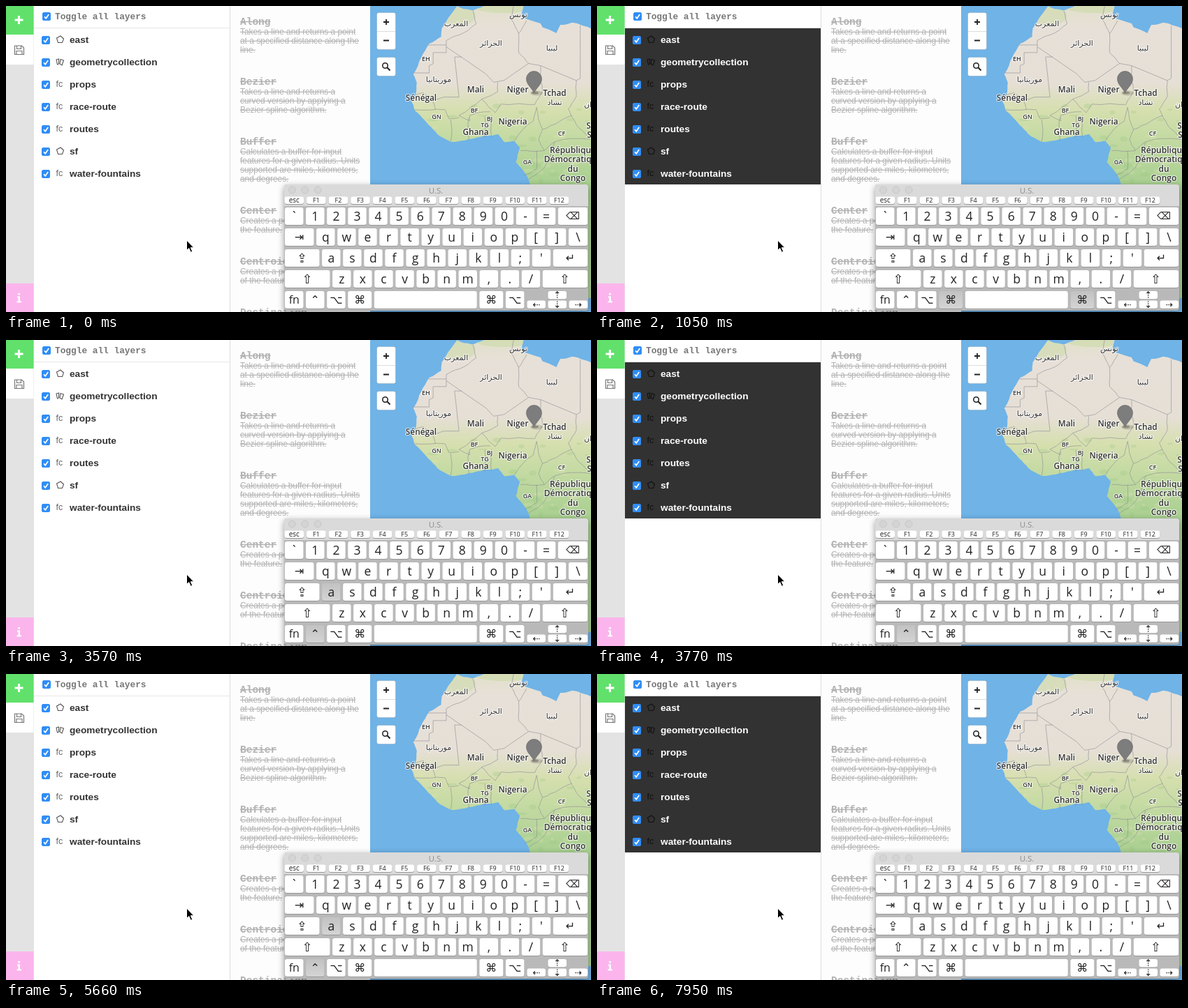
An HTML page that plays this animation: 837x439 px, repeating every 8 s.

```html
<!DOCTYPE html>
<html lang="en">
<head>
<meta charset="utf-8">
<title>Layer list shortcuts</title>
<style>
  html, body { margin: 0; width: 100%; height: 100%; overflow: hidden; background: #fff; }
  svg { display: block; width: 837px; height: 439px; }
  text { white-space: pre; }
  .sans { font-family: "Liberation Sans", Arial, sans-serif; }
  .mono { font-family: "Liberation Mono", "Courier New", monospace; font-weight: 700; }
  .strike { text-decoration: line-through; fill: #b2b2b2; }
  .label { font-family: "Open Sans", "DejaVu Sans", sans-serif; font-weight: 600; fill: #333;
    text-anchor: middle; paint-order: stroke; stroke: #fff; stroke-opacity: .75; stroke-width: 2.2px; stroke-linejoin: round; }
  .arabic { font-family: "DejaVu Sans", sans-serif; font-weight: 400; }
  .key { font-family: "Open Sans", "DejaVu Sans", sans-serif; text-anchor: middle; fill: #222; }
  .sym { font-family: "DejaVu Sans", sans-serif; }
  #board { filter: drop-shadow(0 3px 5px rgba(0,0,0,.4)); }
</style>
</head>
<body>
<svg viewBox="0 0 837 439" xmlns="http://www.w3.org/2000/svg">
  <defs>
    <linearGradient id="landFill" gradientUnits="userSpaceOnUse" x1="0" y1="0" x2="0" y2="256">
      <stop offset="0" stop-color="#e2e0ca"/>
      <stop offset=".12" stop-color="#e7e0d8"/>
      <stop offset=".43" stop-color="#e6dfd6"/>
      <stop offset=".58" stop-color="#d6dfaf"/>
      <stop offset=".72" stop-color="#c6dba4"/>
      <stop offset="1" stop-color="#a8cf90"/>
    </linearGradient>
    <linearGradient id="keyDown" x1="0" y1="0" x2="0" y2="1">
      <stop offset="0" stop-color="#c2c2c2"/><stop offset="1" stop-color="#d4d4d4"/>
    </linearGradient>
    <clipPath id="mapClip"><path d="M521 0H837V439H521Z"/></clipPath>
    <clipPath id="landClip"><path id="landShape"/></clipPath>
  </defs>

  <rect width="837" height="439" fill="#fff"/>
  <g id="rail">
    <rect width="40" height="439" fill="#e3e3e3"/>
    <rect width="39.500" height="41" fill="#61e16b"/>
    <path d="M18.500 14V26M12.500 20H24.500" stroke="#fff" stroke-width="3"/>
    <rect y="41" width="39.500" height="43" fill="#fff"/>
    <g fill="none" stroke="#777" stroke-width="1.200">
      <path d="M12.500 57H22.500L25.500 60V69.500H12.500Z"/>
      <path d="M15.500 57V61.500H21.500V57M15 69V64.500H23V69"/>
    </g>
    <rect y="398" width="39.500" height="41" fill="#fbb5ec"/>
    <path d="M16 416.500H20V423.500H22V425.500H15.500V423.500H17.500V418.500H16ZM17.200 412H20V414.600H17.200Z" fill="#fff"/>
  </g>
  <g id="layers"></g>
  <rect x="320" width="202" height="439" fill="#fdfdfd"/>
  <path d="M320.500 0V439" stroke="#ddd"/>
  <g id="docs"></g>
  <g id="map" clip-path="url(#mapClip)"></g>
  <g id="controls">
    <g fill="#fff" stroke="#000" stroke-opacity=".12">
      <rect x="530.500" y="9.500" width="27" height="53" rx="3"/>
      <rect x="530.500" y="73.500" width="27" height="27" rx="3"/>
    </g>
    <path d="M531 36.500H557" stroke="#ddd"/>
    <path d="M540 23H548M544 19V27M540 49.500H548" stroke="#222" stroke-width="1.800"/>
    <circle cx="542.500" cy="85.500" r="3.700" fill="none" stroke="#222" stroke-width="1.600"/>
    <path d="M545.300 88.300L549.500 92.500" stroke="#222" stroke-width="2"/>
  </g>
  <g id="board"></g>
  <path d="M258.500 336V350.500L261.800 347.500L264.300 353.300L266.700 352.200L264.300 346.700H268.800Z"
    fill="#000" stroke="#fff" stroke-width="1"/>
</svg>

<script>
const LOOP = 8000;
const $ = id => document.getElementById(id);
const text = (x, y, size, cls, str, extra = '') =>
  `<text x="${x}" y="${y}" font-size="${size}" class="${cls}" ${extra}>${str}</text>`;

let seed = 7;
const rnd = () => (seed = seed * 16807 % 2147483647) / 2147483647;
const spread = size => (rnd() - .5) * size;

// Layer list
const polygonIcon = 'M72.5 46L78 43L82.5 47L80.500 52.500H74.500Z';
const mixedIcon = 'M72 45L75.500 44V51L73.500 52ZM78 44.500L82.500 46L80 53L77 51Z';
const layers = [
  ['east', polygonIcon], ['geometrycollection', mixedIcon], ['props'], ['race-route'],
  ['routes'], ['sf', polygonIcon], ['water-fountains'],
];
const checkbox = (x, y) =>
  `<g transform="translate(${x} ${y})">
    <rect x=".5" y=".5" width="11" height="11" rx="2.500" fill="#fff" stroke="#bbb"/>
    <g class="on"><rect width="12" height="12" rx="2.500" fill="#2f8df7"/>
    <path d="M3 6.300L5.200 8.800L9.200 3" fill="none" stroke="#fff" stroke-width="1.700"/></g></g>`;

$('layers').innerHTML =
  '<path d="M40 31.500H320" stroke="#e8e8e8"/>' + checkbox(52, 9) +
  text(70, 19, 12.8, 'mono', 'Toggle all layers', 'fill="#777"') +
  '<rect id="selection" x="40" y="32" width="280" height="224" fill="#323232"/>' +
  layers.map(([name, icon], i) =>
    `<g class="row" transform="translate(0 ${i * 32})">` + checkbox(51, 43) +
    (icon ? `<path class="icon" d="${icon}" fill="none" stroke-width="1.100"/>`
          : text(71.5, 52, 12.5, 'sans kind', 'fc')) +
    text(91, 53, 13.7, 'sans name', name, 'font-weight="700"') + '</g>').join('');

// Function reference, flowing down the column
const docs = [
  ['Along', 'Takes a line and returns a point', 'at a specified distance along the', 'line.'],
  ['Bezier', 'Takes a line and returns a', 'curved version by applying a', 'Bezier spline algorithm.'],
  ['Buffer', 'Calculates a buffer for input', 'features for a given radius. Units',
    'supported are miles, kilometers,', 'and degrees.'],
  ['Center', 'Creates a point at the center of', 'the feature.'],
  ['Centroid', 'Creates a point at the centroid', 'of the feature.'],
  ['Destination'],
];
let docY = 26.5;
for (const [title, ...lines] of docs) {
  $('docs').innerHTML += text(335, docY, 14.5, 'mono strike', title) +
    lines.map((s, i) => text(335, docY + 14.5 + i * 13, 11.9, 'sans strike', s)).join('');
  docY += 47 + 13 * lines.length;
}

// Map: Mercator projection of "lon,lat" key points, roughened by midpoint displacement
const project = ([lon, lat]) => [
  679.4 + 5.69 * lon,
  220 - 325.9 * Math.log(Math.tan(Math.PI / 4 + lat * Math.PI / 360)),
];
const roughen = (pts, amount) => pts.flatMap((p, i) => {
  const q = pts[i + 1];
  if (!q) return [p];
  const size = amount * Math.hypot(q[0] - p[0], q[1] - p[1]);
  return [p, p.map((v, k) => (v + q[k]) / 2 + spread(size))];
});
const trace = (str, amount = 0) => {
  const pts = str.split(' ').map(s => project(s.split(',').map(Number)));
  const fine = roughen(roughen(pts, amount), amount);
  return 'M' + fine.map(p => p.map(v => v.toFixed(1))).join('L');
};

const coast = [
  '-6,36 -9.8,31.4 -10,29.5 -13,28 -14.9,25 -17,21 -16.1,19 -16.5,16 -17.5,14.7 -16.6,12.2 -13.2,8.7 -11,6.4 -7.5,4.4',
  '-3,5.1 1,6 4.4,6.3 6,4.3 8.5,4.6 9.8,3 8.8,-.7 12,-5 14,-11 12,-18 18,-34 28,-33',
  '28,31.2 23,32.6 20,32.1 19,30.3 15.5,31.6 15,32.4 10.2,33.8 11,37.5 2,36.6 -2,35.1 -5,35.6',
].join(' ');
const straight = [
  '-8.7,28.7 -8.7,26 -12,26 -12,23.4 -13,23 -13,21.3 -17,21.3',
  '-8.7,27.7 -13.2,27.7',
  '-8.7,27.3 1.2,21.1 3.2,19.1 5.8,19.5 12,23.5 15,23 24,19.5 25,20 25,32',
  '-4.8,25 -6.6,25 -5.5,15.5 -9.3,15.5',
];
const winding = [
  '-2,35 -1.2,32.3 -5.5,29.9 -8.7,28.7',
  '12,23.5 9.5,26 9.5,30.2 7.6,33.3 8.4,37',
  '9.5,30.2 11.5,33',
  '-9.3,15.5 -12.2,14.8 -14.5,16.6 -16.5,16',
  '24,19.5 24,15.7 22,12.6 24,8.7 27.4,5.1 18.6,4.4 16,2.2 10,2.2',
  '15,23 15.5,17 13.6,13.7 5,13.8 3.6,11.7',
  '4.2,19.1 4.2,16.8 .2,15 3.6,11.7',
  '.2,15 -5.5,11 -2.8,9.7 -2.8,11 2.4,11.9',
  '-5.5,10.5 -8,10.2 -9,12.4 -16.7,12.4',
  '-11.4,12.4 -12.2,14.8',
  '8.5,4.7 13.2,9.6 14,13 15.5,7.5 14.5,5 16,2.2',
  '15.5,7.5 19,9 22.9,11',
  '18.6,4.4 16,-2 12,-5',
  '14,2.2 14,-2.4 11,-4',
  ...[-7.6, -3, 1, 2.7].map(lon => `${lon},${5.3 + lon / 9} ${lon},${10.8 + lon / 9}`),
];
const land = trace(coast, .12) + 'Z';
const borders = straight.map(s => trace(s)).join('') + winding.map(s => trace(s, .12)).join('');
$('landShape').setAttribute('d', land);

const patch = (x, y, rx, ry, fill, opacity) =>
  `<ellipse cx="${x}" cy="${y}" rx="${rx}" ry="${ry}" fill="${fill}" opacity="${opacity}"/>`;
let relief = patch(648, 14, 24, 14, '#cfdcae', .6) + patch(712, 2, 40, 8, '#cfdcae', .7);
for (let i = 0; i < 80; i++) {
  relief += patch(700 + spread(272), 200 + spread(116), 2 + rnd() * 7, 1 + rnd() * 3,
    i % 2 ? '#93c47d' : '#dde2b5', .25);
}

const places = [
  [672, 124, 'Mali'], [732, 124, 'Niger'], [785, 129, 'Tchad'], [594, 136, 'Sénégal'],
  [725, 170, 'Nigeria'], [672, 185, 'Ghana'], [601, 79, 'EH'], [616, 162, 'GN'],
  [670, 153, 'BF'], [692, 165, 'BJ'], [685, 174, 'TG'], [795, 186, 'CF'], [746, 227, 'GA'],
  [847, 176, 'South'], [849, 189, 'Sudan'],
];
const arabic = [
  [644, 29, 'المغرب'], [694, 57, 'الجزائر'], [733, 16, 'تونس'], [781, 64, 'ليبيا'],
  [619, 109, 'موريتانيا'], [785, 142, 'تشاد'], [846, 145, 'السودان'],
];
$('map').innerHTML =
  '<rect x="521" width="316" height="439" fill="#6fb3e7"/>' +
  `<path d="${land}" fill="url(#landFill)"/><g clip-path="url(#landClip)">${relief}</g>` +
  `<path d="${borders}" fill="none" stroke="#8f8f96" stroke-width=".8" opacity=".8"/>` +
  places.map(([x, y, s]) => text(x, y, s.length > 2 ? 11.8 : 9, 'label', s)).join('') +
  ['République', 'Démocratique', 'du', 'Congo'].map((s, i) =>
    text(811, 210.5 + i * 13.6, 12, 'label', s)).join('') +
  arabic.map(([x, y, s]) => text(x, y, 11, 'label arabic', s)).join('') +
  `<g id="pin">${patch(759, 125, 9, 3.5, '#000', .14)}${patch(757, 124.5, 5, 2, '#000', .25)}
    <path d="M755.500 125C753 118 744.500 113 744.500 104.500A11 11 0 0 1 766.500 104.500C766.500 113 758 118 755.500 125Z"
      fill="#7d7d7d" stroke="#6b6b6b" stroke-width=".7"/></g>`;

// On-screen keyboard: rows flow from the left, the last key fills the row
const GAP = 3.57, KEY = 26.5, LEFT = 399, RIGHT = 832;
const symbolSize = { '⌫': 14, '⇧': 18, '⇪': 18 };
const key = (x, y, w, label, h = 25, small = 0) => {
  const sym = /[\u2190-\u23ff]/.test(label);
  const size = small || (sym ? symbolSize[label] || 16 : label.length > 1 ? 16 : 17.5);
  return `<g data-key="${label}"><rect x="${x}" y="${y + 1}" width="${w}" height="${h}" rx="3" fill="#999"/>
    <rect class="cap" x="${x}" y="${y}" width="${w}" height="${h}" rx="3" fill="#fff"/>` +
    text(x + w / 2, y + h / 2 + size * .35, size, sym ? 'key sym' : 'key', label) + '</g>';
};
const row = (y, labels, wide = {}, fill = true) => {
  let x = LEFT;
  return labels.map((label, i) => {
    const last = fill && i === labels.length - 1;
    const w = last ? RIGHT - x : !i && wide.first || wide[label] || KEY;
    const out = key(x, y, w, label);
    x += w + GAP;
    return out;
  }).join('');
};
const arrow = (col, y, label) => key(745.5 + col * 30, y, KEY, label, 11.5, 13);

$('board').innerHTML =
  `<rect x="398" y="256" width="435" height="181" rx="4" fill="#b9b9b9"/>
   <path d="M398 287V260Q398 256 402 256H829Q833 256 833 260V287Z" fill="#dadada"/>` +
  [0, 1, 2].map(i => `<circle cx="${409.5 + i * 18.3}" cy="264" r="5" fill="#d4d4d4" stroke="#c8c8c8"/>`).join('') +
  text(615, 268.5, 11.5, 'key', 'U.S.', 'style="fill:#8d8d8d"') +
  Array.from({ length: 13 }, (_, i) =>
    key(398.5 + i * 31.6, 273.5, 27.5, i ? 'F' + i : 'esc', 10.5, i ? 9 : 10)).join('') +
  row(289, [...'`1234567890-=⌫']) +
  row(319, [...'⇥qwertyuiop[]\\'], { first: 41.5 }) +
  row(349, [...'⇪asdfghjkl;\'↵'], { first: 49.5 }) +
  row(379, [...'⇧zxcvbnm,./⇧'], { first: 64.5 }) +
  row(409, ['fn', ...'⌃⌥⌘ ⌘⌥'], { '⌘': 34, ' ': 147 }, false) +
  arrow(0, 422.5, '⇠') + arrow(1, 409, '⇡') + arrow(1, 422.5, '⇣') + arrow(2, 422.5, '⇢');

// Timeline: [start, end] spans in ms
const spans = {
  '⌘': [[420, 2940]],
  '⌃': [[3360, 7950]],
  'a': [[840, 1050], [3570, 3770], [5660, 5860]],
  '⌫': [[4400, 4610]],
  selected: [[840, 1890], [3770, 4400], [5860, LOOP]],
  hidden: [[6490, 7540]],
};
const active = (name, t) => spans[name].some(([from, to]) => t >= from && t < to);
const all = sel => [...document.querySelectorAll(sel)];
const keys = all('[data-key]').filter(g => spans[g.dataset.key])
  .map(g => [g.dataset.key, g.querySelector('.cap')]);
const names = all('.name'), kinds = all('.kind'), icons = all('.icon'), ticks = all('.row .on');
const show = (el, on) => el.setAttribute('visibility', on ? 'visible' : 'hidden');

function draw(t) {
  const selected = active('selected', t), visible = !active('hidden', t);
  show($('selection'), selected);
  show($('pin'), visible);
  ticks.forEach(el => show(el, visible));
  names.forEach(el => el.setAttribute('fill', selected ? '#fff' : '#333'));
  kinds.forEach(el => el.setAttribute('fill', selected ? '#111' : '#666'));
  icons.forEach(el => el.setAttribute('stroke', selected ? '#111' : '#555'));
  keys.forEach(([id, cap]) => cap.setAttribute('fill', active(id, t) ? 'url(#keyDown)' : '#fff'));
}

const start = performance.now();
function tick() {
  draw((performance.now() - start) % LOOP);
  requestAnimationFrame(tick);
}
tick();
</script>
</body>
</html>
```
